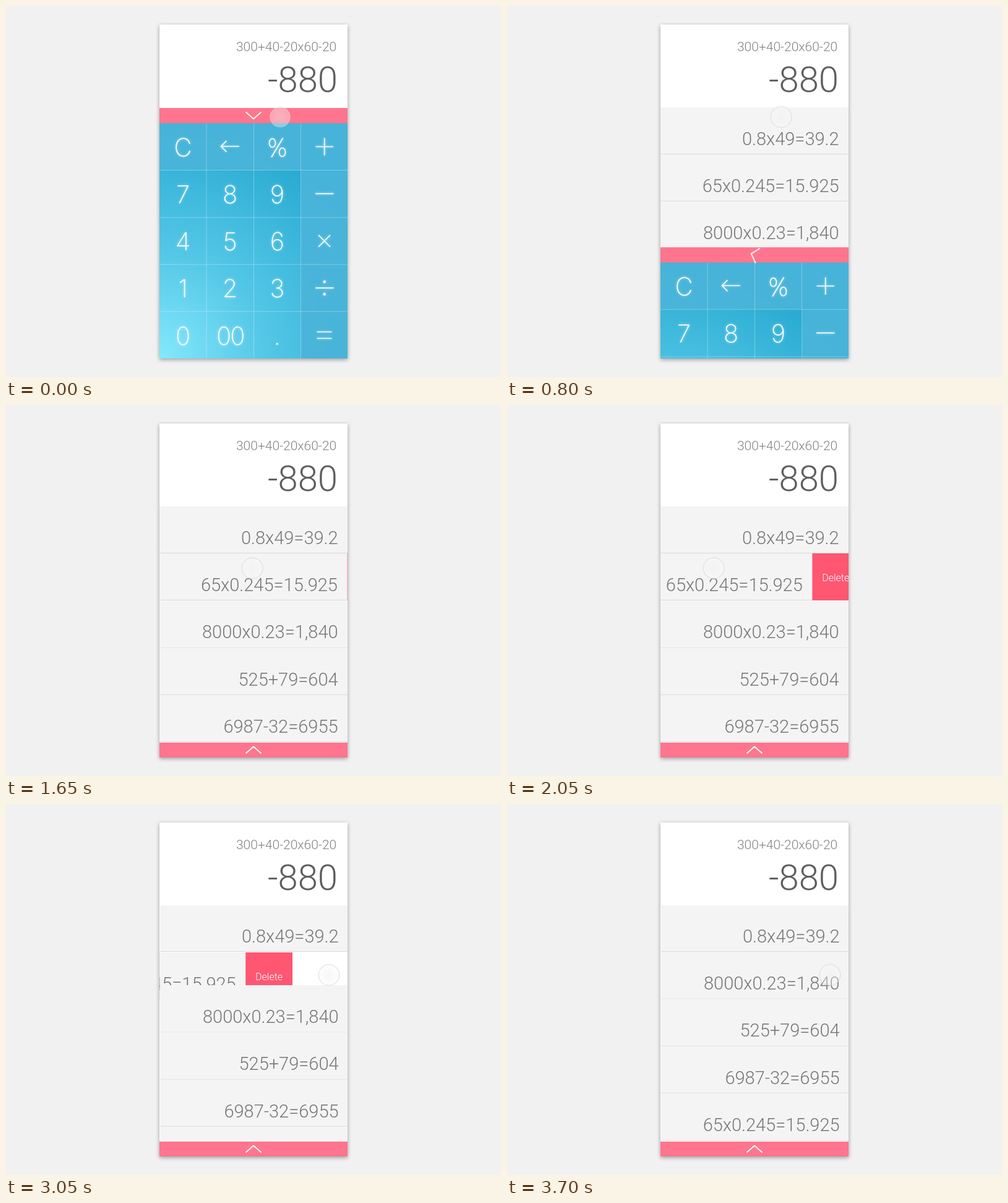
Write an HTML page that moves like this. It is 800 by 600 pixels and loops after 4200 ms.

```html
<!DOCTYPE html>
<html lang="en">
<head>
<meta charset="utf-8">
<title>Calculator history</title>
<style>
  html, body { margin: 0; width: 100%; height: 100%; overflow: hidden; background: #f1f1f1; }
  svg { display: block; width: 800px; height: 600px; font-family: Roboto, sans-serif; font-weight: 300; }

  .card { fill: #fff; filter: drop-shadow(0 2px 3px rgba(0, 0, 0, .36)); }
  .end { text-anchor: end; }
  .row rect { fill: #f4f4f4; }
  .row path { stroke: #dadada; }
  .row text { fill: #767676; font-size: 29px; }
  .keys { fill: none; stroke: #fff; stroke-width: 1.7; filter: drop-shadow(0 0 2px rgba(255, 255, 255, .6)); }
  .keys text { fill: #fff; stroke: none; font: 200 40px Inter, sans-serif; text-anchor: middle; }

  .anim { animation: 4200ms ease infinite; }
  #drawer { animation-name: open; }
  #chevron { animation-name: flip; }
  #swiped { animation-name: swipe; }
  #lower { animation-name: rise; }
  #list { animation-name: nudge; }
  #touch { animation-name: touch; }

  @keyframes open {
    0%, 11.905% { transform: translateY(0); }
    32.857%, 100% { transform: translateY(381px); }
  }
  @keyframes flip {
    0%, 11.905% { transform: rotate(0deg); }
    32.857%, 100% { transform: rotate(180deg); }
  }
  @keyframes swipe {
    0%, 38.929% { transform: translateX(0); }
    59.881%, 68.81% { transform: translateX(-76px); }
    88.095%, 100% { transform: translateX(-380px); }
  }
  @keyframes rise {
    0%, 68.81% { transform: translateY(0); }
    88.095%, 100% { transform: translateY(-76.3px); }
  }
  @keyframes nudge {
    0%, 68.81% { transform: translate(0, 0); }
    68.82%, 100% { transform: translate(1px, -1px); }
  }
  @keyframes touch {
    0%, 11.905% { transform: translate(443px, 179.5px) scale(.95); }
    16.667% { transform: translate(443px, 179.5px) scale(1); }
    28.571% { transform: translate(443px, 179.5px) scale(1); animation-timing-function: ease-in-out; }
    36.905%, 38.929% { transform: translate(399px, 264px) scale(1); }
    57.143% { transform: translate(322px, 264px) scale(1); animation-timing-function: ease-in-out; }
    69.048%, 100% { transform: translate(522px, 276.5px) scale(1); }
  }
</style>
</head>
<body>
<svg viewBox="0 0 800 600">
  <defs>
    <clipPath id="frame"><rect x="248" y="30" width="304" height="540"/></clipPath>
    <radialGradient id="sky" gradientUnits="userSpaceOnUse" cx="248" cy="570" r="380">
      <stop offset="0" stop-color="#84e8fc"/>
      <stop offset=".45" stop-color="#54c7e7"/>
      <stop offset="1" stop-color="#29aad1"/>
    </radialGradient>
    <radialGradient id="glass">
      <stop offset="0" stop-color="#f0f0f0" stop-opacity=".5"/>
      <stop offset="1" stop-color="#fafafa" stop-opacity=".35"/>
    </radialGradient>
  </defs>

  <rect class="card" x="248" y="30" width="304" height="540"/>

  <g clip-path="url(#frame)">
    <g id="swiped" class="anim">
      <rect x="552" y="240" width="76" height="76" fill="#ff5672"/>
      <text x="590" y="285" font-size="16" fill="#fff" text-anchor="middle">Delete</text>
    </g>
    <g id="list" class="anim">
      <g id="lower" class="anim"></g>
    </g>

    <rect x="248" y="30" width="304" height="134" fill="#fff"/>
    <text class="end" x="534.2" y="73.3" font-size="21" fill="#808080">300+40-20x60-20</text>
    <text class="end" x="536" y="138.5" font-size="58" fill="#5e5e5e">-880</text>

    <g id="drawer" class="anim">
      <rect x="248" y="189" width="304" height="381" fill="url(#sky)"/>
      <path d="M248 189.5H552V570H476.5V265.5H248Z" fill="#4ab5d9" opacity=".92"/>
      <path d="M324 190V570M400.5 190V570M476.5 190V570M248 265.5H552M248 342H552M248 418H552M248 494H552"
            stroke="#fff" stroke-opacity=".3"/>
      <g id="keys" class="keys">
        <path d="M377 227H347.5M356.5 218L347.5 227L356.5 236"/>
        <path d="M447.500 213.500L429 244.500"/>
        <ellipse cx="430.5" cy="221.500" rx="5" ry="7"/>
        <ellipse cx="446.500" cy="236.500" rx="5" ry="7"/>
        <path d="M500.500 227.500H529M514.700 213.500V241.500"/>
        <path d="M500 303.500H529.500"/>
        <path d="M505 370.500L524 389.500M524 370.500L505 389.500"/>
        <path d="M500 456H529.500"/>
        <circle cx="514.700" cy="446" r="1.400" fill="#fff"/>
        <circle cx="514.700" cy="466" r="1.400" fill="#fff"/>
        <path d="M502.500 527H526.500M502.500 537.500H526.500"/>
      </g>
      <rect x="248" y="165" width="304" height="24.600" fill="#ff758d"/>
      <g transform="translate(400 177)">
        <path id="chevron" class="anim" d="M-12.500 -5.500L0 5.500L12.500 -5.500" fill="none" stroke="#fff" stroke-width="1.900"/>
      </g>
    </g>

    <g id="touch" class="anim">
      <circle r="16.800" fill="url(#glass)" stroke="#d8d8d8" stroke-opacity=".7" stroke-width="1.300"/>
    </g>
  </g>
</svg>
<script>
  const $ = id => document.getElementById(id);

  function add(parent, tag, attrs, text = '') {
    const el = document.createElementNS('http://www.w3.org/2000/svg', tag);
    for (const name in attrs) el.setAttribute(name, attrs[name]);
    el.textContent = text;
    return parent.appendChild(el);
  }

  function addRow(parent, index, label) {
    const y = 163.7 + 76.3 * index;
    const row = add(parent, 'g', { class: 'row' });
    add(row, 'rect', { x: 248, y, width: 304, height: 76.3 });
    add(row, 'path', { d: `M248 ${Math.floor(y + 75.8) + .5}H552` });
    add(row, 'text', { class: 'end', x: 536.6, y: y + 61.1 }, label);
  }

  addRow($('list'), 0, '0.8x49=39.2');
  addRow($('swiped'), 1, '65x0.245=15.925');
  ['8000x0.23=1,840', '525+79=604', '6987-32=6955', '65x0.245=15.925']
    .forEach((label, i) => addRow($('lower'), i + 2, label));

  add($('keys'), 'text', { x: 286, y: 242.7 }, 'C');
  ['7 8 9', '4 5 6', '1 2 3', '0 00 .'].forEach((line, r) =>
    line.split(' ').forEach((key, c) => {
      const attrs = { x: 286 + 76.2 * c, y: 319 + 76.2 * r };
      if (key === '00') attrs['letter-spacing'] = -2;
      add($('keys'), 'text', attrs, key);
    }));
</script>
</body>
</html>
```
